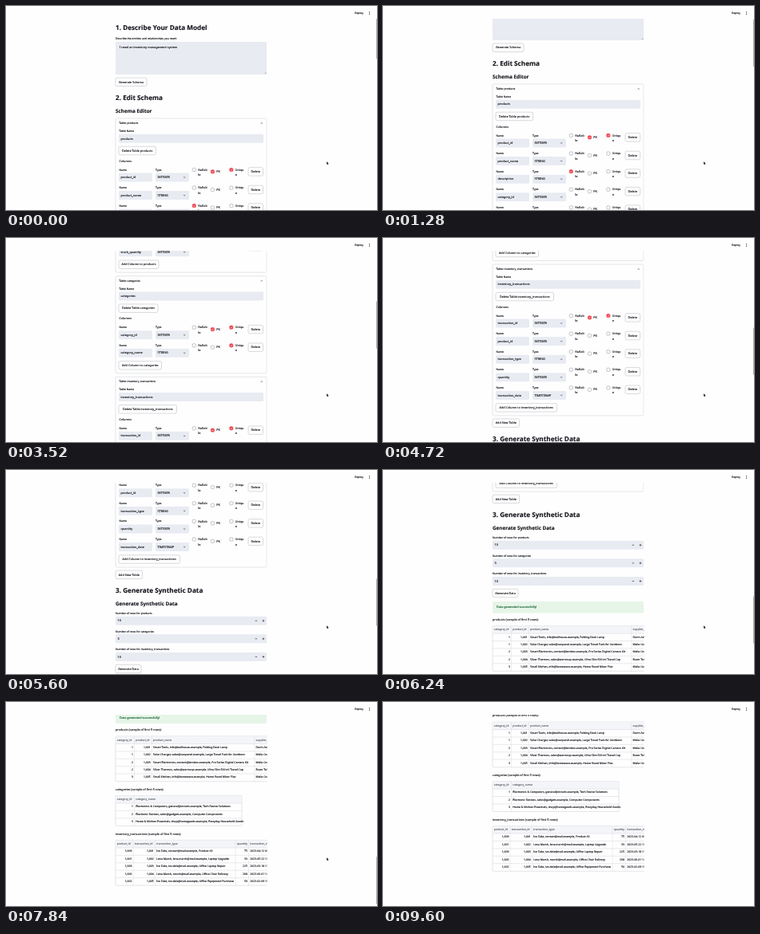
Write an HTML page that moves like this. It is 464 px wide and 256 px high and loops after 9.76 s.

```html
<!DOCTYPE html>
<html lang="en">
<head>
<meta charset="utf-8">
<title>Schema page scroll</title>
<style>
  html, body { margin: 0; width: 100%; height: 100%; overflow: hidden; background: #fefefe; }
  svg { display: block; width: 464px; height: 256px; }
  text {
    font-family: "Noto Sans", "Open Sans", sans-serif; text-rendering: geometricPrecision; white-space: pre;
    color: #16171d; fill: currentColor; stroke: currentColor; stroke-width: .13px;
  }
</style>
</head>
<body>
<svg id="stage" viewBox="0 0 464 256">
  <defs><clipPath id="column"><rect x="136" y="0" width="190.5" height="1100"/></clipPath></defs>
  <g id="page"></g>
  <rect width="464" height="16" fill="#fefefe"/>
  <g id="menu"></g>
  <rect id="thumb" x="463" width="1" fill="#aeaeb0"/>
  <path id="cursor" d="M401 195v4l.9-.8.6 1.4.7-.3-.6-1.3h1.2z" fill="#111" stroke="#fff" stroke-width=".2"/>
</svg>
<script>
const LOOP = 9760, STEP = 80;
const INK = '#16171d', FIELD = '#e8ebf1', LINE = '#d3d5da', RED = '#f0404a', GREY = '#666973';
const BODY = 3.75, SMALL = 3.35, CELL = 3.42;
const $ = id => document.getElementById(id);
let root = $('page');

function add(tag, attrs, content) {
  const el = document.createElementNS('http://www.w3.org/2000/svg', tag);
  for (const k in attrs) el.setAttribute(k, attrs[k]);
  if (content !== undefined) el.textContent = content;
  root.appendChild(el);
  return el;
}
// y is the vertical middle of the line
const text = (x, y, s, size = BODY, more = {}) =>
  add('text', { x, y: y + size * 0.32, 'font-size': size, ...more }, s);
const box = (x, y, w, h, fill, stroke = 'none', rx = 1.4) =>
  add('rect', { x, y, width: w, height: h, rx, fill, stroke, 'stroke-width': 0.6 });
const path = (d, stroke = INK, width = 0.6) =>
  add('path', { d, stroke, fill: 'none', 'stroke-width': width });

const heading = (y, s, size) => text(137, y, s, size, { 'font-weight': 600 });
const field = (x, y, w, s) => { box(x, y - 5.5, w, 11, FIELD); text(x + 2.5, y, s); };
function button(x, y, w, s) {
  box(x, y - 5.25, w, 10.5, '#fefefe', '#bfc1c7', 1.8);
  text(x + w / 2, y, s, BODY, { 'text-anchor': 'middle' });
}
const caret = (x, y, dir) => path(`M${x - 1.1} ${y - 0.5 * dir}l1.1 ${dir}l1.1 ${-dir}`);

function check(x, y, on, lines) {
  box(x, y - 2.1, 4.2, 4.2, on ? RED : '#fefefe', on ? RED : '#9a9ca4', 1.3);
  if (on) path(`M${x + 1.1} ${y}l.8 .9l1.4 -1.8`, '#fff');
  lines.forEach((s, i) => text(x + 7, y + i * 6.4, s));
}

// flags: n = nullable, p = primary key, u = unique
function columnRow(y, [name, type, flags = '']) {
  text(141.5, y, 'Name', SMALL);
  text(187, y, 'Type', SMALL);
  field(141, y + 9.5, 42, name);
  field(187, y + 9.5, 42, type);
  caret(223.2, y + 9.5, 1);
  check(233.2, y, flags.includes('n'), ['Nullab', 'le']);
  check(256.3, y + 2.4, flags.includes('p'), ['PK']);
  check(279.7, y, flags.includes('u'), ['Uniqu', 'e']);
  button(303, y + 2.4, 18.5, 'Delete');
}

function tableEditor(y, name, deleteW, addW, rows) {
  const last = y + 58.5 + 22.6 * (rows.length - 1);
  box(137, y - 6, 189, last + 35 - y + 6, '#fefefe', LINE, 2);
  text(141.5, y, 'Table: ' + name, SMALL);
  caret(319.6, y, -1);
  text(141.5, y + 9.8, 'Table Name', SMALL);
  field(141, y + 19.3, 181, name);
  button(141, y + 34.5, deleteW, 'Delete Table ' + name);
  text(141.5, y + 47.6, 'Columns');
  rows.forEach((r, i) => columnRow(y + 58.5 + 22.6 * i, r));
  button(141, last + 25, addW, 'Add Column to ' + name);
}

function numberInput(y, name, value) {
  text(137, y, `Number of rows for ${name}`, SMALL);
  field(137, y + 9.3, 189, value);
  path(`M311.6 ${y + 9.3}h2.4M320.6 ${y + 9.3}h2.6M321.9 ${y + 8}v2.6`);
}

// cols: [left, label, align right]
function dataTable(y, title, right, cols, rows) {
  const top = y + 8, pitch = 9.4, bottom = top + pitch * (rows.length + 1) + 0.4;
  text(137, y, title + ' (sample of first 5 rows):', BODY, { 'font-weight': 500 });
  box(137, top, right - 137, bottom - top, '#fefefe', LINE, 1);
  box(137.3, top + 0.3, right - 137.6, pitch - 0.3, '#f4f5f8', 'none', 1);
  for (let i = 1; i <= rows.length; i++) path(`M137 ${top + pitch * i + 0.2}H${right}`, LINE, 0.5);
  cols.forEach(([x, label, alignEnd], c) => {
    const edge = c + 1 < cols.length ? cols[c + 1][0] : right;
    if (c) path(`M${x} ${top}V${bottom}`, LINE, 0.4);
    text(x + 1.8, top + 4.7, label, CELL, { style: 'color:' + GREY });
    rows.forEach((r, i) => text(alignEnd ? edge - 1.6 : x + 1.8, top + 13.9 + pitch * i, r[c], CELL,
      { 'text-anchor': alignEnd ? 'end' : 'start' }));
  });
}

function buildPage() {
  root.setAttribute('clip-path', 'url(#column)');
  heading(27.3, '1. Describe Your Data Model', 8.2);
  text(137, 40.5, 'Describe the entities and relationships you need:', SMALL);
  box(137, 45, 189, 41, FIELD);
  text(142, 52, 'I need an inventory management system');
  path('M323.6 85l1.8 -1.8M324.7 85l.7 -.7', GREY, 0.4);
  button(137, 95.3, 39, 'Generate Schema');
  heading(115.3, '2. Edit Schema', 8.2);
  heading(132.2, 'Schema Editor', 6.35);

  tableEditor(147, 'products', 46.5, 50, [
    ['product_id', 'INTEGER', 'pu'], ['product_name', 'STRING'], ['description', 'STRING', 'n'],
    ['category_id', 'INTEGER'], ['unit_price', 'FLOAT'], ['stock_quantity', 'INTEGER']]);
  tableEditor(364, 'categories', 49, 53.5, [
    ['category_id', 'INTEGER', 'pu'], ['category_name', 'STRING', 'u']]);
  tableEditor(490.6, 'inventory_transactions', 72.5, 76.5, [
    ['transaction_id', 'INTEGER', 'pu'], ['product_id', 'INTEGER'], ['transaction_type', 'STRING'],
    ['quantity', 'INTEGER'], ['transaction_date', 'TIMESTAMP']]);
  button(137, 683.8, 33.5, 'Add New Table');

  heading(703.8, '3. Generate Synthetic Data', 8.2);
  heading(720.6, 'Generate Synthetic Data', 6.35);
  numberInput(732.4, 'products', '10');
  numberInput(755, 'categories', '3');
  numberInput(777.6, 'inventory_transactions', '10');
  button(137, 802, 32, 'Generate Data');
  box(137, 812.5, 189, 14.5, '#e6f5e8');
  text(142, 819.7, 'Data generated successfully!', BODY, { style: 'color:#126030' });

  dataTable(835, 'products', 340,
    [[137, 'category_id', 1], [160.5, 'product_id', 1], [182.3, 'product_name'], [310.8, 'supplier_name']], [
    ['1', '1,001', 'Smart Tools, info@toolhouse.example, Folding Desk Lamp', 'Dorin Ashvale'],
    ['1', '1,002', 'Solar Charger, sales@sunpanel.example, Large Travel Pack for Outdoors', 'Melia Corvane'],
    ['2', '1,003', 'Smart Electronics, contact@lensbox.example, Pro Series Digital Camera Kit', 'Melia Corvane'],
    ['2', '1,004', 'Silver Thermos, sales@warmcup.example, Ultra Slim 500 ml Travel Cup', 'Bram Tolvey'],
    ['3', '1,005', 'Small Kitchen, info@homeware.example, Home Stand Mixer Plus', 'Melia Corvane']]);
  dataTable(909.5, 'categories', 295,
    [[137, 'category_id', 1], [160.5, 'category_name']], [
    ['1', 'Electronics & Computers, general@circuits.example, Tech Device Solutions'],
    ['2', 'Electronic Devices, sales@gadgets.example, Computer Components'],
    ['3', 'Home & Kitchen Essentials, shop@homegoods.example, Everyday Household Goods']]);
  dataTable(965.5, 'inventory_transactions', 340,
    [[137, 'product_id', 1], [159, 'transaction_id', 1], [186.3, 'transaction_type'],
     [287, 'quantity', 1], [303.5, 'transaction_date']], [
    ['1,009', '1,001', 'Ivo Dale, contact@mail.example, Product A3', '75', '2023-04-12 09:30'],
    ['1,001', '1,002', 'Lena Marsh, lena.marsh@mail.example, Laptop Upgrade', '33', '2023-05-22 10:15'],
    ['1,009', '1,003', 'Ivo Dale, ivo.dale@mail.example, Office Laptop Repair', '225', '2023-03-18 11:00'],
    ['1,006', '1,004', 'Lena Marsh, marsh@mail.example, Office Chair Delivery', '268', '2023-06-01 14:45'],
    ['1,002', '1,005', 'Ivo Dale, ivo.dale@mail.example, Office Equipment Purchase', '50', '2023-02-09 16:20']]);
}

function buildMenu() {
  root = $('menu');
  text(436, 9, 'Deploy', SMALL);
  [7.4, 9, 10.6].forEach(cy => add('circle', { cx: 454.6, cy, r: 0.5, fill: INK }));
}

// [time, scroll]; equal neighbours are rests
const KNOTS = [[0, 0], [320, 10], [480, 10], [1040, 42], [1200, 42], [2240, 142], [2960, 241], [3520, 310.3],
  [4240, 412], [4320, 412], [4720, 451.6], [5600, 552.5], [6400, 655], [6480, 655], [6880, 693],
  [7520, 774], [8240, 817.3], [8320, 817.3], [8640, 818], [LOOP, 818]];
const slope = i => i < 0 || i >= KNOTS.length - 1 ? 0
  : (KNOTS[i + 1][1] - KNOTS[i][1]) / (KNOTS[i + 1][0] - KNOTS[i][0]);
// harmonic mean keeps the curve monotone
const tangent = i => {
  const a = slope(i - 1), b = slope(i);
  return a * b > 0 ? 2 * a * b / (a + b) : 0;
};

function scrollAt(t) {
  let i = 0;
  while (i < KNOTS.length - 2 && t >= KNOTS[i + 1][0]) i++;
  const [t0, y0] = KNOTS[i], [t1, y1] = KNOTS[i + 1], d = t1 - t0, u = (t - t0) / d;
  const ease = u * u * (3 - 2 * u);
  return y0 + (y1 - y0) * ease + d * u * (1 - u) * (tangent(i) * (1 - u) - tangent(i + 1) * u);
}

function draw(now) {
  const t = Math.floor((now % LOOP) / STEP) * STEP, y = scrollAt(t);
  const top = Math.max(16, 7 + y * 0.234);
  $('page').setAttribute('transform', `translate(0 ${-y.toFixed(2)})`);
  $('thumb').setAttribute('y', top);
  $('thumb').setAttribute('height', 66 + y * 0.234 - top);
  $('thumb').setAttribute('opacity', t < 8880 ? 1 : t < 8960 ? 0.5 : 0);
  $('cursor').setAttribute('opacity', t < 8880 ? 1 : 0);
}

buildPage();
buildMenu();
const start = performance.now();
function tick() {
  draw(performance.now() - start);
  requestAnimationFrame(tick);
}
tick();
</script>
</body>
</html>
```
